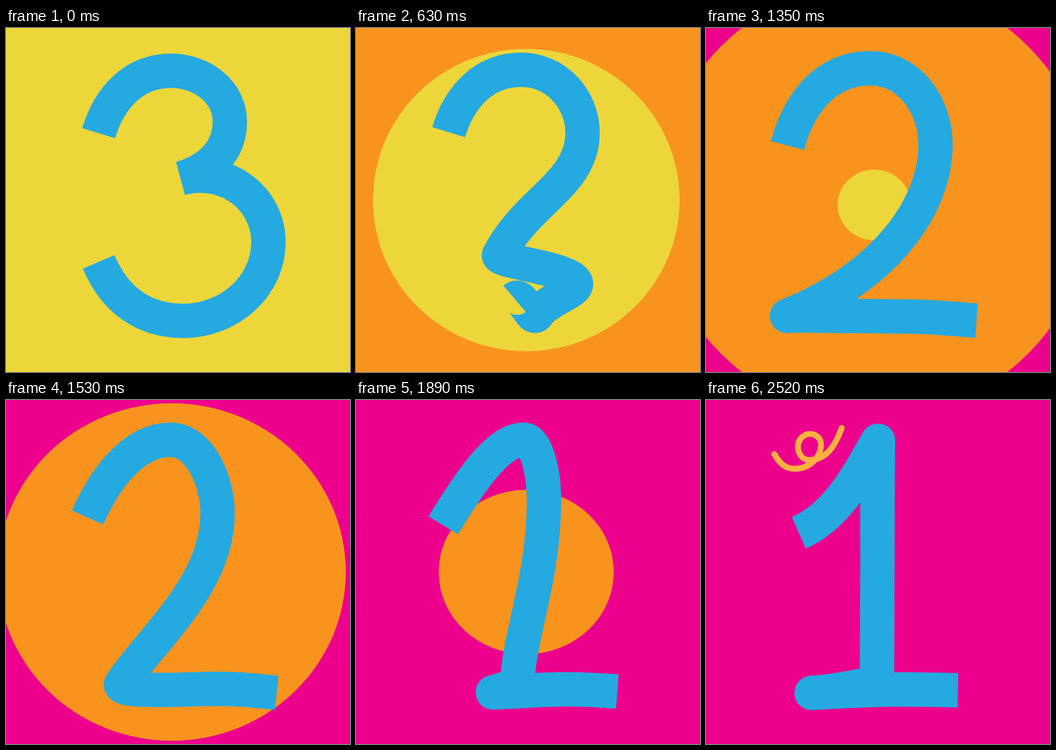
Animation of 700x700 px, one loop 2.79 s. Source, as an HTML page with a canvas:

```html
<!DOCTYPE html>
<html lang="en">
<head>
<meta charset="utf-8">
<title>Countdown</title>
<style>
  html, body { margin: 0; width: 100%; height: 100%; overflow: hidden; background: #edd63a; }
  canvas { display: block; width: 700px; height: 700px; }
</style>
</head>
<body>
<canvas id="stage" width="700" height="700"></canvas>
<script>
const ctx = document.getElementById('stage').getContext('2d');
const YELLOW = '#edd63a', ORANGE = '#f8941e', PINK = '#ec008c', BLUE = '#25a9e1', GOLD = '#fbb040';
const STEP = 90, LOOP = 2790;

const clamp = (v, lo, hi) => Math.min(hi, Math.max(lo, v));

// A knot is a point, a heading in degrees and the pull of its two handles.
// A negative pull turns that handle round and makes a cusp.
const knot = (x, y, heading, pullIn = 1, pullOut = pullIn) => [x, y, heading, pullIn, pullOut];
const right = (x, y, ...pull) => knot(x, y, 0, ...pull);
const down = (x, y, ...pull) => knot(x, y, 90, ...pull);
const left = (x, y, ...pull) => knot(x, y, 180, ...pull);

// Handles are 0.39 of the chord, which makes a quarter turn nearly circular.
function trace(knots) {
  ctx.beginPath();
  ctx.moveTo(knots[0][0], knots[0][1]);
  for (let i = 1; i < knots.length; i++) {
    const [x0, y0, h0, , out] = knots[i - 1], [x1, y1, h1, pull] = knots[i];
    const reach = 0.39 * Math.hypot(x1 - x0, y1 - y0);
    const a = h0 * Math.PI / 180, b = h1 * Math.PI / 180;
    ctx.bezierCurveTo(
      x0 + reach * out * Math.cos(a), y0 + reach * out * Math.sin(a),
      x1 - reach * pull * Math.cos(b), y1 - reach * pull * Math.sin(b), x1, y1);
  }
  ctx.stroke();
}

const three = [knot(188.5, 214, -73), right(336, 87), down(455.5, 191), knot(355, 306, 165, 1, -1.15),
  down(534, 435), left(360, 596), knot(188.5, 476, 247)];
const sagging = [three[0], three[1], down(457, 198), down(376, 381),
  down(528, 496, 0.25, 0.4), left(363, 596), knot(216, 518, 232)];
const bend = down(467, 237, 1, 0.72);
const curling = [knot(188.5, 209, -73), right(337, 82), bend, knot(164, 583, 158, 1.18, -0.9),
  right(322, 544), knot(378, 562, 40), knot(482.5, 600, 1)];
const two = [knot(166, 239, -75), right(334, 82), bend, knot(165, 586, 158, 1.18, -0.1),
  right(310, 586), right(400, 587), knot(550.5, 595.5, 4)];
const narrow = [knot(166, 239, -57), right(336, 80, 0.65), down(394, 225, 1, 1.15), down(305, 568, 0.3, 1),
  right(342, 594), right(450, 588.5), knot(551, 596, 8)];
const foot = [knot(215, 596, -3, -1, 1), right(400, 589), knot(512.5, 590.5, 1)];
const hooked = [knot(189, 271, -60), right(344, 82, 0.5), down(371, 185), knot(352, 575, 95, 1, 0), ...foot];
const one = [knot(189, 270.5, -24), knot(350, 83, -58, 0.57, 0), down(349, 210), down(348, 575, 1, 0), ...foot];

const poses = [[0, three], [3, sagging], [8, curling], [10, two], [11, two], [15, narrow], [19, hooked], [22, one]];

function poseAt(step) {
  const i = poses.findIndex(([at]) => at > step);
  if (i < 0) return one;
  const [t0, from] = poses[i - 1], [t1, to] = poses[i];
  const u = (step - t0) / (t1 - t0);
  return from.map((k, n) => k.map((v, j) => v + (to[n][j] - v) * u));
}

function disc(color, x, y, radius, squash) {
  const r = Math.max(0, radius);
  ctx.fillStyle = color;
  ctx.beginPath();
  ctx.ellipse(x, y, r, r * squash, 0, 0, 2 * Math.PI);
  ctx.fill();
}

function digit(step) {
  ctx.strokeStyle = BLUE;
  ctx.lineWidth = 70;
  ctx.lineCap = 'butt';
  ctx.lineJoin = step ? 'round' : 'bevel';
  trace(poseAt(step));
}

const curl = [knot(276, 57, 110), left(210, 122), knot(187, 95, 270), right(212, 69),
  down(234, 90), left(180, 140), knot(139, 110, 240)];

function streamer(grown) {
  if (grown <= 0) return;
  ctx.strokeStyle = GOLD;
  ctx.lineWidth = 12;
  ctx.lineCap = ctx.lineJoin = 'round';
  ctx.setLineDash([400 * grown, 900]);
  trace(curl);
  ctx.setLineDash([]);
}

function draw(time) {
  const tick = Math.floor((time % LOOP) / STEP);
  // The digits rest at the start, on the two and at the end.
  const step = clamp(tick - 2, 0, 10) + clamp(tick - 14, 0, 14);
  const age = (step - 11) / 4;
  ctx.fillStyle = step < 11 ? ORANGE : PINK;
  ctx.fillRect(0, 0, 700, 700);
  if (age >= 0) disc(ORANGE, 343 - 18 * age + 13.5 * age ** 2, 350, 442 - 176 * age, 1 - 0.06 * Math.min(age, 1));
  disc(YELLOW, 350 - 0.7 * step, 350 + 10 * (step / 11) ** 6, 510 - 39.6 * step, 1 - 0.007 * clamp(step - 3, 0, 5));
  digit(step);
  streamer((step - 21) / 3);
}

const start = performance.now();
function loop() {
  draw(performance.now() - start);
  requestAnimationFrame(loop);
}
loop();
</script>
</body>
</html>
```
